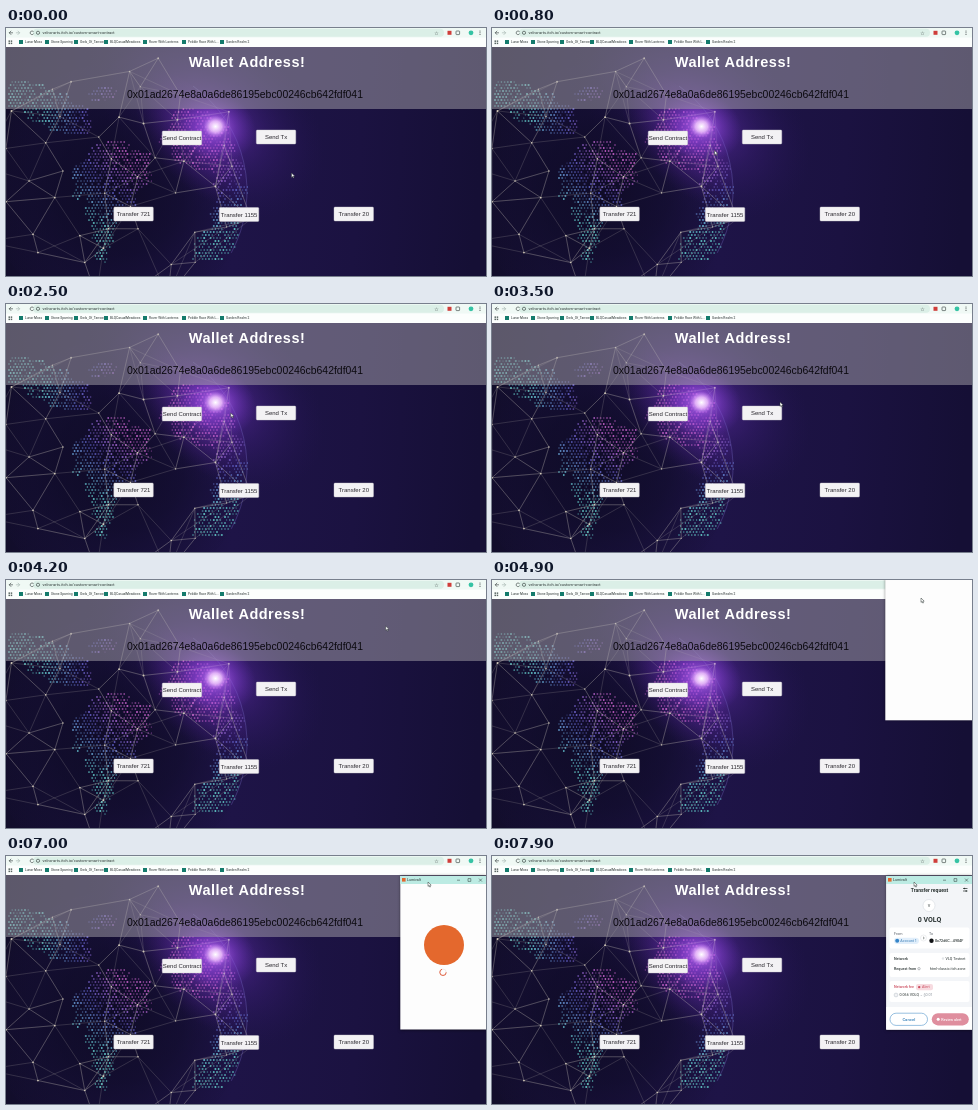
An HTML page with a canvas for the animation above (8000 ms loop, 480 by 248 pixels).

```html
<!DOCTYPE html>
<html lang="en">
<head>
<meta charset="utf-8">
<title>Wallet page</title>
<style>
html, body { margin: 0; width: 100%; height: 100%; overflow: hidden; background: #0d0a24; }
canvas { display: block; width: 480px; height: 248px; }
</style>
</head>
<body>
<canvas id="stage" width="480" height="248"></canvas>
<script>
const W = 480, H = 248, LOOP = 8000;
const ARIAL = '"Liberation Sans", Arial, sans-serif';
const UI = 'Roboto, "Open Sans", sans-serif';
const POPUP_AT = 4300, FRAME_AT = 5600, LOAD_AT = 6600, FORM_AT = 7500;
const INK = '#2b3433', GREY = '#565d66';
const GLOBE = { x: 112, y: 163, r: 129 };

const view = document.getElementById('stage').getContext('2d');
const scene = document.createElement('canvas');
scene.width = W;
scene.height = H;
let g = scene.getContext('2d');

let seed = 11;
function random(lo = 0, hi = 1) {
  seed = (seed * 16807) % 2147483647;
  return lo + (hi - lo) * seed / 2147483647;
}

function rect(x, y, w, h, fill) {
  g.fillStyle = fill;
  g.fillRect(x, y, w, h);
}

function paint(fill, line, width) {
  if (fill) { g.fillStyle = fill; g.fill(); }
  if (line) { g.strokeStyle = line; g.lineWidth = width; g.stroke(); }
}

function pill(x, y, w, h, r, fill, line, width = 0.6) {
  g.beginPath();
  g.roundRect(x, y, w, h, r);
  paint(fill, line, width);
}

function disc(x, y, r, fill, line, width = 0.6) {
  g.beginPath();
  g.arc(x, y, r, 0, 7);
  paint(fill, line, width);
}

function arc(x, y, r, from, to, line, width) {
  g.beginPath();
  g.arc(x, y, r, from, to);
  paint(null, line, width);
}

function path(points, line, width, fill) {
  g.beginPath();
  points.forEach(p => g.lineTo(...p));
  paint(fill, line, width);
}

function text(str, x, y, font, color, align = 'left', spacing = 0) {
  g.font = font;
  g.fillStyle = color;
  g.textAlign = align;
  g.letterSpacing = spacing + 'px';
  g.fillText(str, x, y);
}

function gradient(grad, stops) {
  stops.forEach((c, i) => grad.addColorStop(i / (stops.length - 1), c));
  return grad;
}

function glow(x, y, rx, ry, turn, stops) {
  g.save();
  g.translate(x, y);
  g.rotate(turn);
  g.scale(1, ry / rx);
  rect(-rx, -rx, 2 * rx, 2 * rx, gradient(g.createRadialGradient(0, 0, 0, 0, 0, rx), stops));
  g.restore();
}

function inEllipse(x, y, cx, cy, rx, ry, turn) {
  const dx = x - cx, dy = y - cy, c = Math.cos(turn), s = Math.sin(turn);
  return Math.hypot((dx * c + dy * s) / rx, (dy * c - dx * s) / ry) < 1;
}

function isLand(x, y) {
  const wobble = 3 * Math.sin(x * 0.3) + 3 * Math.sin(y * 0.27 + x * 0.1);
  x += wobble;
  const t = (y - 112) / 126;
  const south = t > 0 && t < 1 &&
    Math.abs(x - 110 + 16 * t) < 37 * Math.sin(Math.PI * Math.sqrt(t)) ** 1.3;
  const reach = Math.hypot(x - GLOBE.x, y - GLOBE.y) / GLOBE.r;
  const east = x > 180 && y > 130 && y < 232 && reach > 0.73 && reach < 0.99;
  return south || east ||
    inEllipse(x, y, 42, 80, 48, 19, 0.45) ||
    inEllipse(x, y, 98, 66, 15, 8, -0.2) ||
    inEllipse(x, y, 190, 112, 36, 29, 0.6);
}

function drawSpace() {
  rect(0, 0, W, H, gradient(g.createLinearGradient(0, 0, W, 30),
    ['#110d29', '#171037', '#1e1447', '#1b1241', '#150f35']));
  glow(205, 92, 125, 85, 0.6, ['rgba(112,52,185,.75)', 'rgba(70,34,135,.35)', 'rgba(40,22,90,0)']);
}

function drawGlobe() {
  const { x, y, r } = GLOBE;
  g.save();
  g.beginPath();
  g.arc(x, y, r, 0, 7);
  g.clip();
  glow(x, y, r, r, 0, ['rgba(13,10,34,.75)', 'rgba(16,12,42,.6)', 'rgba(24,16,58,.1)']);
  glow(195, 108, 85, 48, 0.85, ['rgba(140,62,205,.7)', 'rgba(92,42,160,.35)', 'rgba(60,28,120,0)']);
  g.restore();

  for (let py = 48; py < 240; py += 3) {
    for (let px = 3; px < 242; px += 3.2) {
      if (!isLand(px, py) || random() < 0.15) continue;
      const warm = Math.max(0, 1 - Math.hypot(px - 165, (py - 105) * 1.2) / 130);
      const hue = 178 + 120 * Math.min(1, warm * 1.8);
      disc(px + (py % 2) * 1.6, py, random(0.6, 1.1), `hsla(${hue},52%,60%,${random(0.45, 0.95)})`);
    }
  }
  arc(x, y, r, -0.95, 0.5, 'rgba(120,110,200,.35)', 1);
}

function drawNetwork() {
  const nodes = [];
  for (let i = 0; i < 46; i++) {
    const a = i * 2.4, d = 142 * Math.sqrt((i + 0.5) / 46);
    nodes.push([GLOBE.x + d * Math.cos(a) + random(-12, 12), 150 + d * Math.sin(a) * 0.86 + random(-10, 10)]);
  }
  nodes.forEach((a, i) => {
    const far = b => Math.hypot(a[0] - b[0], a[1] - b[1]);
    const near = [...nodes].sort((p, q) => far(p) - far(q));
    near.slice(1, i % 3 ? 4 : 7).forEach(b => path([a, b], 'rgba(205,198,190,.36)', 0.5));
    disc(...a, random(0.6, 1), 'rgba(240,230,205,.8)');
  });
}

function drawFlare() {
  glow(209, 98, 42, 34, 0.4, ['rgba(205,125,255,.85)', 'rgba(145,70,225,.4)', 'rgba(110,50,195,0)']);
  glow(209.5, 98.5, 12, 11, 0, ['#fff', 'rgba(245,205,255,.75)', 'rgba(215,140,255,0)']);
}

function button(label, x, y) {
  pill(x, y, 39.5, 14, 1, '#f3f2f4', '#c8c5cd', 0.4);
  text(label, x + 19.75, y + 9.3, '6px ' + ARIAL, '#29272d', 'center');
}

function drawBrowser() {
  rect(0, 0, W, 19, '#fcfefd');
  rect(0, 0, W, 9.5, '#f0f9f5');
  pill(27, 0.8, 411, 8, 4, '#dbefe7');
  for (const [x, dir, color] of [[3.2, 1, INK], [13.7, -1, '#9aaba7']]) {
    path([[x + 2 * dir, 2.8], [x, 4.8], [x + 2 * dir, 6.8]], color, 0.6);
    path([[x, 4.8], [x + 3.8 * dir, 4.8]], color, 0.6);
  }
  arc(27 - 1, 4.8, 1.8, 0.4, 5.8, INK, 0.6);
  disc(32, 4.8, 1.6, null, INK);
  text('velno-arts.itch.io/custom-smart-contract', 36.5, 6.2, '4px ' + UI, INK);
  text('☆', 430.5, 6.6, '5px "DejaVu Sans", sans-serif', INK, 'center');
  rect(441.5, 2.8, 4, 4, '#cf3d3a');
  pill(450, 3, 3.6, 3.6, 0.6, null, INK);
  disc(465, 4.8, 2.4, '#35c3a4');
  for (let y = 3; y < 8; y += 1.7) disc(474, y, 0.5, INK);

  for (const x of [2.5, 4.7]) for (const y of [12.4, 14.6]) rect(x, y, 1.5, 1.5, '#596663');
  const marks = {
    'Lunar Moss': 13, 'Stone Sparring': 39, 'Owls_Of_Tarrow': 68, 'BLQCasualMeadows': 98,
    'Rover With Lanterns': 137, 'Pebble Race With L...': 176, 'Garden Realm 2': 214
  };
  for (const [name, x] of Object.entries(marks)) {
    rect(x, 12, 4, 4, '#147b6c');
    text(name, x + 6, 15.4, '3.3px ' + UI, INK);
  }
}

function buildScene() {
  drawSpace();
  drawGlobe();
  drawNetwork();
  drawFlare();
  rect(0, 19, W, 62, 'rgba(168,164,172,.5)');
  text('Wallet Address!', 241, 39, 'bold 14.5px ' + ARIAL, '#fff', 'center', 0.5);
  text('0x01ad2674e8a0a6de86195ebc00246cb642fdf041', 239, 69.7, '10.43px ' + ARIAL, '#0c0a10', 'center');
  button('Send Contract', 156.2, 103);
  button('Send Tx', 250.3, 102);
  button('Transfer 721', 107.8, 179);
  button('Transfer 1155', 213.3, 179.5);
  button('Transfer 20', 328, 179);
  drawBrowser();
}

function shadowBox(x, y, w, h) {
  g.save();
  g.shadowColor = 'rgba(0,0,0,.55)';
  g.shadowBlur = 3;
  rect(x, y, w, h, '#fdfdfd');
  g.restore();
}

function drawWindow() {
  shadowBox(394.3, 20, 86, 153.5);
  rect(394.3, 20, 86, 8, '#bcebe3');
  rect(396, 22, 3.6, 3.6, '#e4682d');
  text('Lumivalt', 401, 25.4, '3.7px ' + UI, INK);
  path([[451, 24.2], [454, 24.2]], INK, 0.5);
  pill(462, 22.6, 2.8, 2.8, 0, null, INK, 0.5);
  path([[473, 22.6], [476, 25.6]], INK, 0.5);
  path([[476, 22.6], [473, 25.6]], INK, 0.5);
}

function drawLoader(t) {
  const turn = t / 1000 * Math.PI * 2;
  disc(438, 89, 20, '#e4682d');
  disc(437, 116.3, 3.2, null, '#eee5e1', 0.8);
  arc(437, 116.3, 3.2, turn, turn + 4.4, '#e0522f', 0.9);
}

function drawForm() {
  const small = '3.7px ' + UI, strong = '500 3.7px ' + UI, red = '#cb4a5c';
  const card = (y, h) => pill(397.5, y, 80, h, 2, '#fff');
  const row = (y, label, value) => {
    text(label, 402, y, strong, INK);
    text(value, 473.5, y, small, INK, 'right');
  };
  rect(394.3, 28, 86, 145.5, '#f3f5f8');
  text('Transfer request', 437.5, 36, 'bold 5px ' + UI, INK, 'center');
  for (const [x, y] of [[472.5, 32.5], [474.2, 35]]) {
    path([[471, y], [475.5, y]], INK, 0.7);
    disc(x, y, 0.8, INK);
  }
  disc(437, 49.5, 6, '#fff', '#d7dce1');
  text('V', 437, 51, '4px ' + UI, INK, 'center');
  text('0 VOLQ', 437.5, 65.7, 'bold 7px ' + UI, INK, 'center');

  card(71.5, 21);
  text('From', 402, 78.5, small, GREY);
  pill(402, 81.7, 25, 6.2, 3.1, '#e2effb');
  disc(405.2, 84.8, 2, '#3685c8');
  text('Account 1', 408.3, 86.1, small, '#367bb5');
  disc(431.5, 82, 3, '#fff', '#e2e5e8');
  path([[431, 80.8], [432.3, 82], [431, 83.2]], INK, 0.5);
  text('To', 437, 78.5, small, GREY);
  disc(439.5, 84.8, 2.2, '#101215');
  text('0x72d6C...4904F', 443, 86.1, strong, INK);

  card(97, 24);
  row(103.8, 'Network', 'VLQ Testnet');
  disc(451, 102.5, 1.2, '#e2e5e8');
  row(114, 'Request from', 'html-classic.itch.zone');
  disc(427, 112.7, 1.2, null, GREY, 0.4);

  card(125, 21);
  text('Network fee', 402, 132.4, strong, red);
  pill(424, 128, 17, 6.2, 2, '#f7dbe0');
  disc(427.2, 131.1, 1.2, red);
  text('Alert', 430, 132.4, small, red);
  disc(404, 139, 1.9, '#f1f2f4', '#b7bfc7', 0.5);
  text('0.066 VOLQ', 407.5, 140.3, small, INK);
  text('~ $0.01', 428, 140.3, small, '#8c939c');

  rect(394.3, 151, 86, 22.5, '#fff');
  pill(398, 157.2, 37.5, 12.2, 6.1, '#fff', '#5296cb');
  text('Cancel', 416.8, 164.8, '500 4.2px ' + UI, '#347fb8', 'center');
  pill(439.8, 157.2, 37, 12.2, 6.1, '#df8e9e');
  disc(446.2, 163.3, 1.5, '#fff');
  text('Review alert', 449.3, 164.6, strong, '#fff');
}

// Each move: start, duration, and where the pointer comes to rest.
const MOVES = [
  [400, 700, 182, 108], [2200, 600, 267, 110], [3250, 250, 288, 98],
  [3750, 750, 429, 18], [5400, 500, 423, 23], [6000, 400, 422, 26]
];

function cursorAt(t) {
  let x = 285.5, y = 145;
  for (const [from, span, tx, ty] of MOVES) {
    const p = Math.min(1, Math.max(0, (t - from) / span)), e = p * p * (3 - 2 * p);
    x += (tx - x) * e;
    y += (ty - y) * e;
  }
  return [x, y];
}

function drawCursor(x, y) {
  g.save();
  g.translate(x, y);
  g.lineJoin = 'round';
  path([[0, 0], [0, 4.4], [1, 3.5], [1.8, 5.1], [2.5, 4.8], [1.8, 3.2], [3.2, 3.1], [0, 0]], INK, 0.5, '#fff');
  g.restore();
}

function draw(t) {
  g.drawImage(scene, 0, 0);
  if (t >= FRAME_AT) {
    drawWindow();
    if (t >= FORM_AT) drawForm();
    else if (t >= LOAD_AT) drawLoader(t);
  } else if (t >= POPUP_AT) {
    shadowBox(393.3, -2, 88, 142.3);
  }
  drawCursor(...cursorAt(t));
}

buildScene();
g = view;
const start = performance.now();
function tick() {
  draw((performance.now() - start) % LOOP);
  requestAnimationFrame(tick);
}
tick();
</script>
</body>
</html>
```
